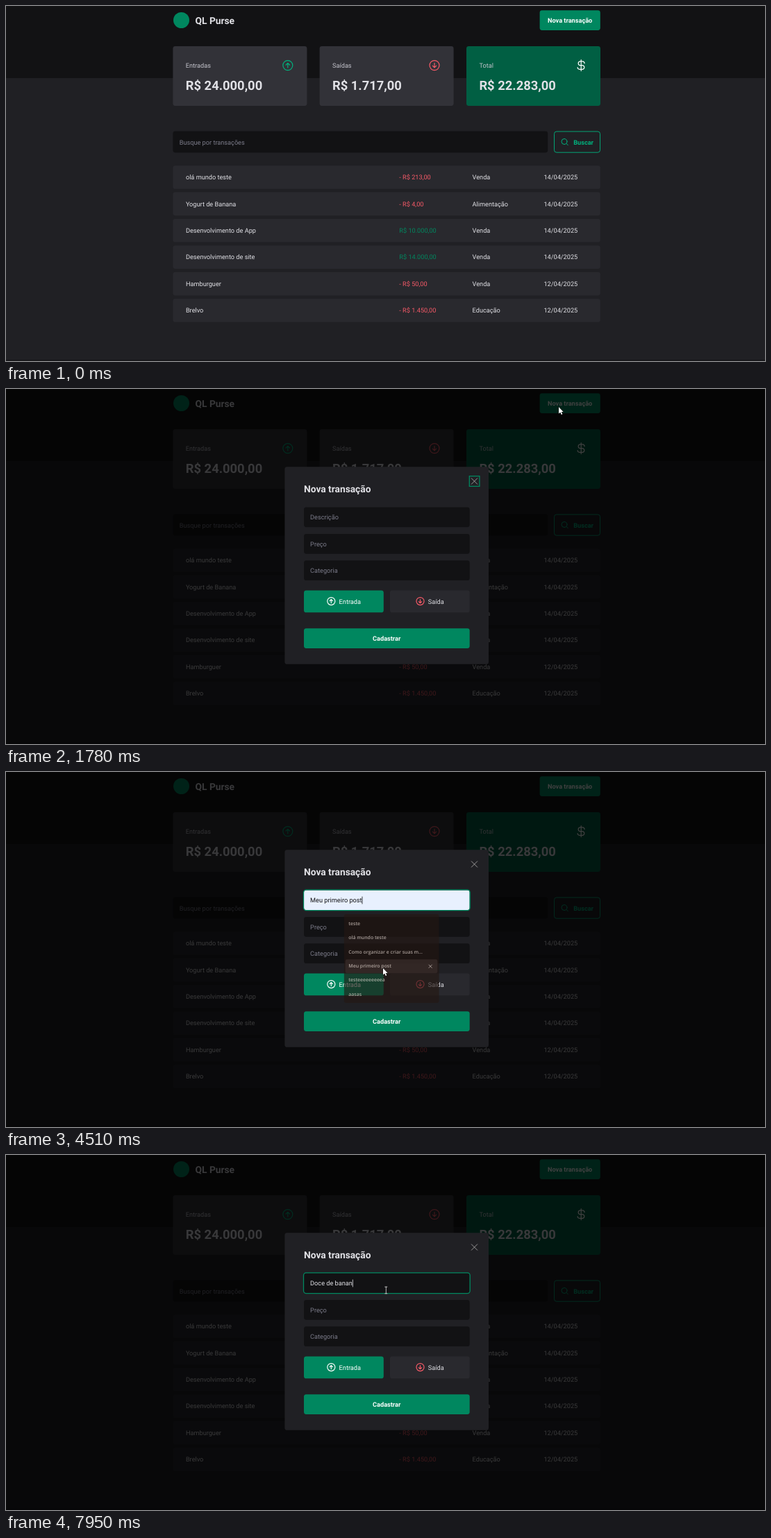
Write an HTML page with a canvas that moves like this. It is 1093x512 px and loops after 8000 ms.

```html
<!DOCTYPE html>
<html lang="pt-BR">
<head>
<meta charset="utf-8">
<title>Transações</title>
<style>
html, body { margin: 0; width: 100%; height: 100%; overflow: hidden; background: #202024; }
canvas { display: block; }
</style>
</head>
<body>
<canvas id="stage" width="1093" height="512"></canvas>
<script>
const ctx = document.getElementById('stage').getContext('2d');
ctx.textRendering = 'geometricPrecision';

const LOOP = 8000, BASE = 9.19;
const WHITE = '#fff', LIGHT = '#e1e1e6', SOFT = '#c4c4cc', MUTED = '#7c7c8a', INK = '#121214',
  PANEL = '#202024', ROW = '#29292e', CARD = '#323238', DEEP = '#015f43', GREEN = '#00875f',
  MINT = '#00b37e', RED = '#f75a68', PALE = '#e8f0fe';

// Key moments in ms
const PRESS = 1570, OPEN = 1775, FOCUS = 2640, ACCEPT = 4440, SELECT = 5425, TYPE = 6690;

const ROWS = [
  ['olá mundo teste', '- R$ 213,00', 'Venda', '14/04/2025'],
  ['Yogurt de Banana', '- R$ 4,00', 'Alimentação', '14/04/2025'],
  ['Desenvolvimento de App', 'R$ 10.000,00', 'Venda', '14/04/2025'],
  ['Desenvolvimento de site', 'R$ 14.000,00', 'Venda', '14/04/2025'],
  ['Hamburguer', '- R$ 50,00', 'Venda', '12/04/2025'],
  ['Brelvo', '- R$ 1.450,00', 'Educação', '12/04/2025']
];
const HINTS = ['teste', 'olá mundo teste', 'Como organizar e criar suas metas',
  'Meu primeiro post', 'testeeeeeeeeea', 'aasas'];
const TYPED = 'Doce de banan';

// Pointer stops: time, x, y
const PATH = [
  [190, 1053, 503], [560, 622, 298], [650, 593, 312], [790, 593, 312], [1560, 796, 26],
  [1980, 796, 26], [2600, 548, 187], [2840, 548, 187], [3300, 545, 253], [3380, 545, 253],
  [3640, 543, 281], [3710, 543, 281], [3770, 543, 283], [4640, 543, 283], [5170, 547, 195]
];

const clamp = v => Math.max(0, Math.min(1, v));

function pointer(t) {
  const i = PATH.findIndex(p => p[0] > t);
  if (i < 0) return PATH[PATH.length - 1].slice(1);
  const [t0, x0, y0] = PATH[i - 1], [t1, x1, y1] = PATH[i];
  const u = (t - t0) / (t1 - t0), e = u * u * (3 - 2 * u);
  return [x0 + (x1 - x0) * e, y0 + (y1 - y0) * e];
}

function box(x, y, w, h, fill, r = 3.4) {
  ctx.beginPath();
  ctx.roundRect(x, y, w, h, r);
  ctx.fillStyle = fill;
  ctx.fill();
}

function frame(x, y, w, h, color, width, r = 3.4) {
  ctx.beginPath();
  ctx.roundRect(x, y, w, h, r);
  ctx.strokeStyle = color;
  ctx.lineWidth = width;
  ctx.stroke();
}

// y is the middle of the capital letters
function text(s, x, y, color, size = BASE, weight = 400, family = 'Roboto') {
  ctx.font = `${weight} ${size}px ${family}, sans-serif`;
  ctx.fillStyle = color;
  ctx.fillText(s, x, y + size * 0.356);
  return ctx.measureText(s).width;
}

const hintText = (s, x, y, color, size = 7) => text(s, x, y, color, size, 600, '"Open Sans"');

function line(d, color, width = 1.1, x = 0, y = 0, k = 1) {
  ctx.save();
  ctx.translate(x, y);
  ctx.scale(k, k);
  ctx.strokeStyle = color;
  ctx.lineWidth = width / k;
  ctx.lineCap = ctx.lineJoin = 'round';
  ctx.stroke(new Path2D(d));
  ctx.restore();
}

const RING = 'M7 0A7 7 0 1 1-7 0A7 7 0 1 1 7 0';
const upIcon = (x, y, color, k = 1) => line(RING + 'M0 3.3V-3M-2.7-.6L0-3.3L2.7-.6', color, 1.2, x, y, k);
const downIcon = (x, y, color, k = 1) => line(RING + 'M0-3.3V3M-2.7 .6L0 3.3L2.7 .6', color, 1.2, x, y, k);
const cross = (x, y, r, color, w) => line(`M${-r} ${-r}L${r} ${r}M${r} ${-r}L${-r} ${r}`, color, w, x, y);

function card(x, label, amount, fill) {
  box(x, 58, 193, 86, fill);
  text(label, x + 18.4, 85.8, SOFT);
  text(amount, x + 18.4, 114.7, LIGHT, 18.37, 700);
}

function page(hover, ring) {
  ctx.fillStyle = PANEL;
  ctx.fillRect(0, 0, 1093, 512);
  ctx.fillStyle = INK;
  ctx.fillRect(0, 0, 1093, 104);
  ctx.fillStyle = '#18181b';
  ctx.fillRect(0, 510, 1093, 2);

  box(241, 9, 23, 23, GREEN, 11.5);
  text('QL Purse', 272.5, 20.6, LIGHT, 13.78, 700);
  box(768.6, 6.3, 87.2, 28.7, hover ? DEEP : GREEN);
  if (ring) frame(768, 5.7, 88.4, 29.9, GREEN, 1.2, 4);
  text('Nova transação', 780, 20.8, WHITE, BASE, 700);

  card(240.4, 'Entradas', 'R$ 24.000,00', CARD);
  card(451.6, 'Saídas', 'R$ 1.717,00', CARD);
  card(663, 'Total', 'R$ 22.283,00', DEEP);
  upIcon(405.8, 85.6, MINT);
  downIcon(617, 85.6, RED);
  line('M0-8V8M4.9-2.9A3 3 0 0 0 2-5.7H-1.7A2.9 2.9 0 0 0-1.7 0H2.2A2.9 2.9 0 0 1 2.2 5.7H-2.2A3 3 0 0 1-5.1 2.9',
    WHITE, 1.2, 828.2, 85.6);

  box(240.4, 180.5, 539.8, 31, INK);
  text('Busque por transações', 249.7, 196.4, MUTED);
  frame(789.5, 181, 66, 30.2, MINT, 0.9);
  line('M4 0A4 4 0 1 1-4 0A4 4 0 1 1 4 0M2.9 2.9L5.3 5.3', MINT, 1, 804, 195.5);
  text('Buscar', 817.2, 196.4, MINT, BASE, 700);

  ROWS.forEach(([name, price, kind, date], i) => {
    const y = 230.2 + i * 38.4, mid = y + 16.8;
    box(240.4, y, 615.4, 33.6, ROW);
    text(name, 258.9, mid, LIGHT);
    text(price, 566.3, mid, price[0] === '-' ? RED : GREEN);
    text(kind, 671.6, mid, LIGHT);
    text(date, 774.4, mid, LIGHT);
  });
}

function field(t, hint) {
  const accepted = t >= ACCEPT && t < TYPE, typing = t >= TYPE;
  const x = 438.1, y = 185;
  box(429, 170.4, 238.7, 28.8, accepted || hint ? PALE : INK);
  if (t >= FOCUS) frame(428.5, 169.9, 239.7, 29.8, GREEN, 1.3, 3.9);

  let width = 0, caret = false;
  if (hint) {
    hintText(hint, x, y + 0.3, '#1c1c20', 7.1);
  } else if (typing) {
    const early = Math.floor((t - TYPE) / 100) + 1;
    const late = 9 + Math.max(0, Math.floor((t - 7685) / 85) + 1);
    width = text(TYPED.slice(0, t < 7685 ? Math.min(9, early) : late), x, y, LIGHT);
    caret = true;
  } else if (accepted) {
    const chosen = t >= SELECT;
    if (chosen) {
      ctx.fillStyle = '#2f64d8';
      ctx.fillRect(438, 179.4, 75, 11);
    }
    width = text(HINTS[3], x, y, chosen ? WHITE : INK);
    caret = t < ACCEPT + 500;
  } else {
    text('Descrição', x, y, MUTED);
    caret = t >= FOCUS;
  }
  if (caret) {
    ctx.fillStyle = accepted ? INK : LIGHT;
    ctx.fillRect(x + width, 179.6, 0.8, 10.8);
  }
}

function modal(t, hint) {
  ctx.fillStyle = 'rgba(0,0,0,.75)';
  ctx.fillRect(0, 0, 1093, 512);
  box(401.4, 112.2, 293.6, 284.6, PANEL);
  text('Nova transação', 429, 144, LIGHT, 13.78, 700);
  cross(674.5, 133, 4.2, '#a8a5a5', 0.9);
  if (t < FOCUS) frame(667.3, 125.6, 14.6, 14.8, GREEN, 1.3, 0);

  field(t, hint);
  ['Preço', 'Categoria'].forEach((label, i) => {
    box(429, 208.9 + i * 38.4, 238.7, 28.8, INK);
    text(label, 438.1, 223.5 + i * 38.4, MUTED);
  });

  box(429, 290.4, 114.8, 31.9, GREEN);
  upIcon(468.3, 306.1, WHITE, 0.79);
  text('Entrada', 479.6, 306.3, WHITE);
  box(552.9, 290.4, 114.8, 31.9, ROW);
  downIcon(596.5, 306.1, RED, 0.79);
  text('Saída', 607.8, 306.3, LIGHT);
  box(429, 345.2, 238.7, 28.7, GREEN);
  ctx.textAlign = 'center';
  text('Cadastrar', 548.2, 359.6, WHITE, BASE, 700);
  ctx.textAlign = 'left';
}

function popup(alpha, active) {
  const k = 0.957 + 0.043 * alpha;
  ctx.save();
  ctx.globalAlpha = alpha;
  ctx.translate(555, 269);
  ctx.scale(k, k);
  ctx.translate(-555, -269);
  box(485.8, 204, 138.8, 130, '#241813', 3);
  HINTS.forEach((s, i) => {
    const y = 217.5 + i * 20.65;
    if (i === active) {
      box(487.6, y - 9.2, 134.8, 20.4, '#3b302c', 2.5);
      cross(612, y + 1, 2.2, '#f3e6df', 0.9);
    }
    hintText(s.length > 30 ? s.slice(0, 29) + '...' : s, 492.4, y + 0.3, '#f3e6df');
  });
  ctx.restore();
}

function arrow(x, y) {
  const shape = new Path2D('M0 0V9.4L2.2 7.5L3.8 10.9L5.3 10.2L3.7 6.9H6.6Z');
  ctx.save();
  ctx.translate(x, y);
  ctx.fillStyle = WHITE;
  ctx.strokeStyle = '#111';
  ctx.lineWidth = 0.9;
  ctx.stroke(shape);
  ctx.fill(shape);
  ctx.restore();
}

function draw(t) {
  const shown = t >= 190, open = t >= OPEN;
  const [x, y] = shown ? pointer(t) : [0, 0];
  const hover = shown && !open && x > 768 && x < 856 && y < 35;
  const fade = clamp((t - FOCUS) / 130) * (1 - clamp((t - ACCEPT) / 200));
  const active = t >= ACCEPT ? 3 : Math.floor((y - 207.5) / 20.65);
  const hint = fade > 0 && t < ACCEPT && active >= 0 ? HINTS[active] : '';

  page(hover, t >= PRESS && !open);
  if (open) modal(t, hint);
  if (fade > 0) popup(fade, active);
  if (!shown) return;
  if (open && x > 429 && x < 668 && y > 170 && y < 199.5) {
    const onPale = t >= ACCEPT && t < TYPE;
    line('M-1.6-4.8H1.6M0-4.8V4.8M-1.6 4.8H1.6', onPale ? '#333' : '#ddd', 0.8, x + 0.3, y);
  } else {
    arrow(x, y);
  }
}

function tick() {
  draw(performance.now() % LOOP);
  requestAnimationFrame(tick);
}
tick();
</script>
</body>
</html>
```
